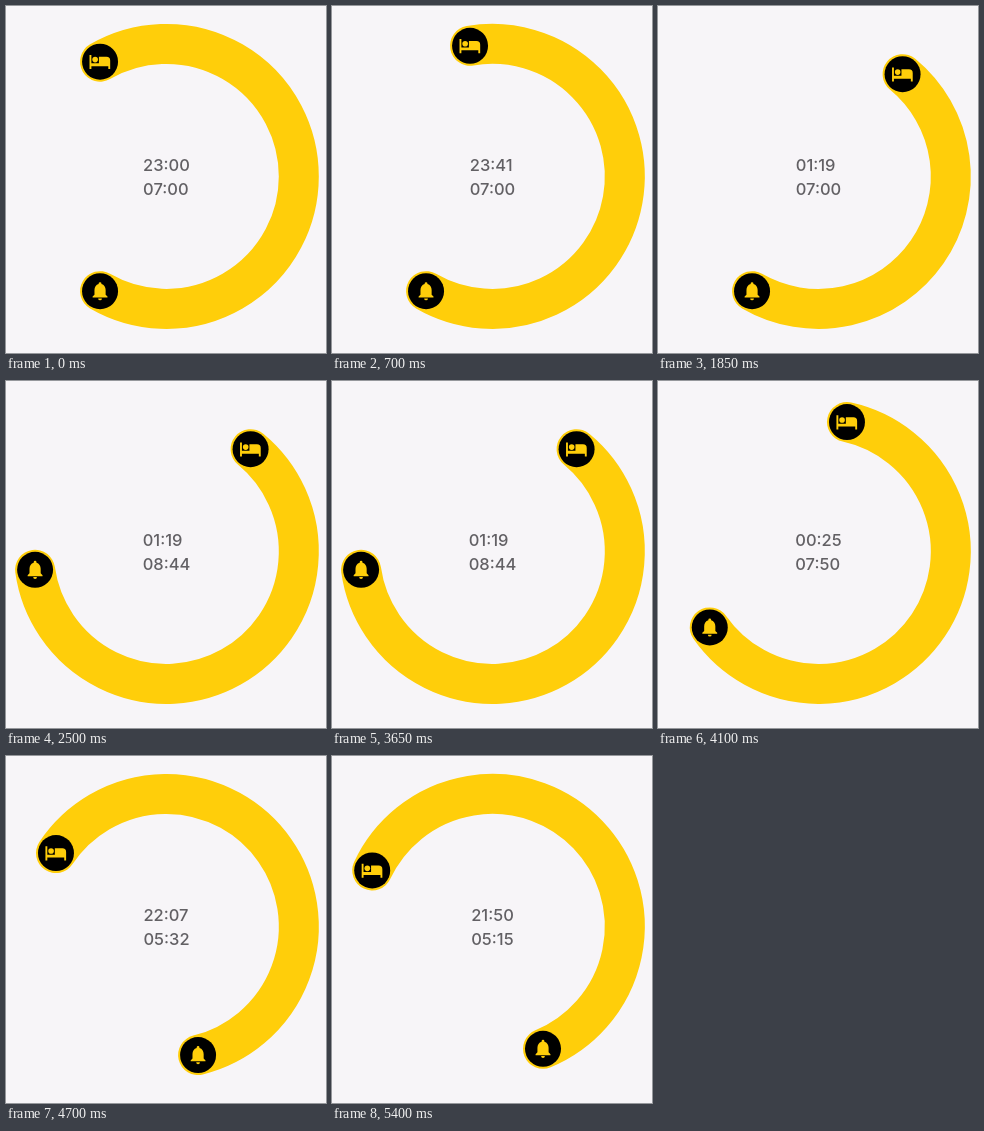
Animation of 320x347 px, one loop 5.45 s. Source, as an HTML page:

```html
<!DOCTYPE html>
<html lang="en">
<head>
<meta charset="utf-8">
<title>Sleep timer dial</title>
<style>
html, body { margin: 0; width: 100%; height: 100%; overflow: hidden; background: #f7f5f8; }
svg { position: absolute; left: 0; top: 0; display: block; }
#times {
  position: absolute; left: 160.5px; top: 146.5px; transform: translateX(-50%);
  font: 500 16.5px/24.4px Inter, "Open Sans", sans-serif; color: #626064; white-space: nowrap;
}
</style>
</head>
<body>
<svg width="320" height="347" viewBox="0 0 320 347">
  <path id="band" fill="none" stroke="#ffce0a" stroke-width="40" stroke-linecap="round"/>
  <g id="bed">
    <circle r="18"/>
    <g fill="#ffce0a" transform="translate(-.2 .3) scale(.94)">
      <circle cx="-5" cy="-2.5" r="3"/>
      <path d="M-11-7.5h2v9h8v-7h8a4 4 0 0 1 4 4v9h-2v-3H-9v3h-2z"/>
    </g>
  </g>
  <g id="bell">
    <circle r="18"/>
    <g fill="#ffce0a" transform="scale(.93)">
      <path d="M-1.5-7.6V-8.2a1.5 1.5 0 0 1 3 0v.6C4.4-6.9 6-4.3 6-1.2v5l2 2v1H-8v-1l2-2v-5C-6-4.3-4.4-6.9-1.5-7.6z"/>
      <path d="M-2 7.8h4a2 2 0 0 1-4 0z"/>
    </g>
  </g>
</svg>
<div id="times"><div id="sleep"></div><div id="wake"></div></div>
<script>
const LOOP = 5450, STEP = 50;
const CX = 160.3, CY = 170.4, R = 132.5;

// Turn in degrees over time in ms, for each drag
const bedDrag = [[400, 0], [950, 48], [1050, 58], [1500, 69.5]];
const bellDrag = [[2000, 0], [2500, 52]];
const bandDrag = [[3800, 0], [4100, 27], [4450, 73], [4900, 104.5]];

const el = id => document.getElementById(id);
const [band, bed, bell, sleep, wake] = ['band', 'bed', 'bell', 'sleep', 'wake'].map(el);

function slope(keys, i) {
  if (i === 0 || i === keys.length - 1) return 0;
  const rise = k => (keys[k + 1][1] - keys[k][1]) / (keys[k + 1][0] - keys[k][0]);
  const a = rise(i - 1), b = rise(i);
  return 2 * a * b / (a + b);
}

// Monotone curve through the keys, at rest at both ends
function follow(keys, t) {
  const last = keys.length - 1;
  if (t <= keys[0][0]) return keys[0][1];
  if (t >= keys[last][0]) return keys[last][1];
  const i = keys.findIndex(k => k[0] > t) - 1;
  const [t0, v0] = keys[i], [t1, v1] = keys[i + 1];
  const h = t1 - t0, u = (t - t0) / h, w = 1 - u;
  return v0 * (1 + 2 * u) * w * w + v1 * u * u * (3 - 2 * u)
    + h * (slope(keys, i) * u * w * w - slope(keys, i + 1) * u * u * w);
}

function place(deg) {
  const a = deg * Math.PI / 180;
  return [CX + R * Math.sin(a), CY - R * Math.cos(a)].map(n => n.toFixed(2)).join(' ');
}

// The dial is a 12-hour face: two minutes per degree
function clock(deg) {
  const m = (Math.round(deg * 2) + 1440) % 1440;
  const pad = n => String(n).padStart(2, '0');
  return pad(Math.floor(m / 60)) + ':' + pad(m % 60);
}

function draw(t) {
  const shift = follow(bandDrag, t);
  const from = -30 + follow(bedDrag, t) - shift;
  const to = 210 + follow(bellDrag, t) - shift;
  const a = place(from), b = place(to);
  band.setAttribute('d', `M${a}A${R} ${R} 0 ${to - from > 180 ? 1 : 0} 1 ${b}`);
  bed.setAttribute('transform', `translate(${a})`);
  bell.setAttribute('transform', `translate(${b})`);
  sleep.textContent = clock(from);
  wake.textContent = clock(to);
}

const start = performance.now();
function tick() {
  const t = (performance.now() - start) % LOOP;
  draw(Math.floor(t / STEP) * STEP);
  requestAnimationFrame(tick);
}
draw(0);
requestAnimationFrame(tick);
</script>
</body>
</html>
```
